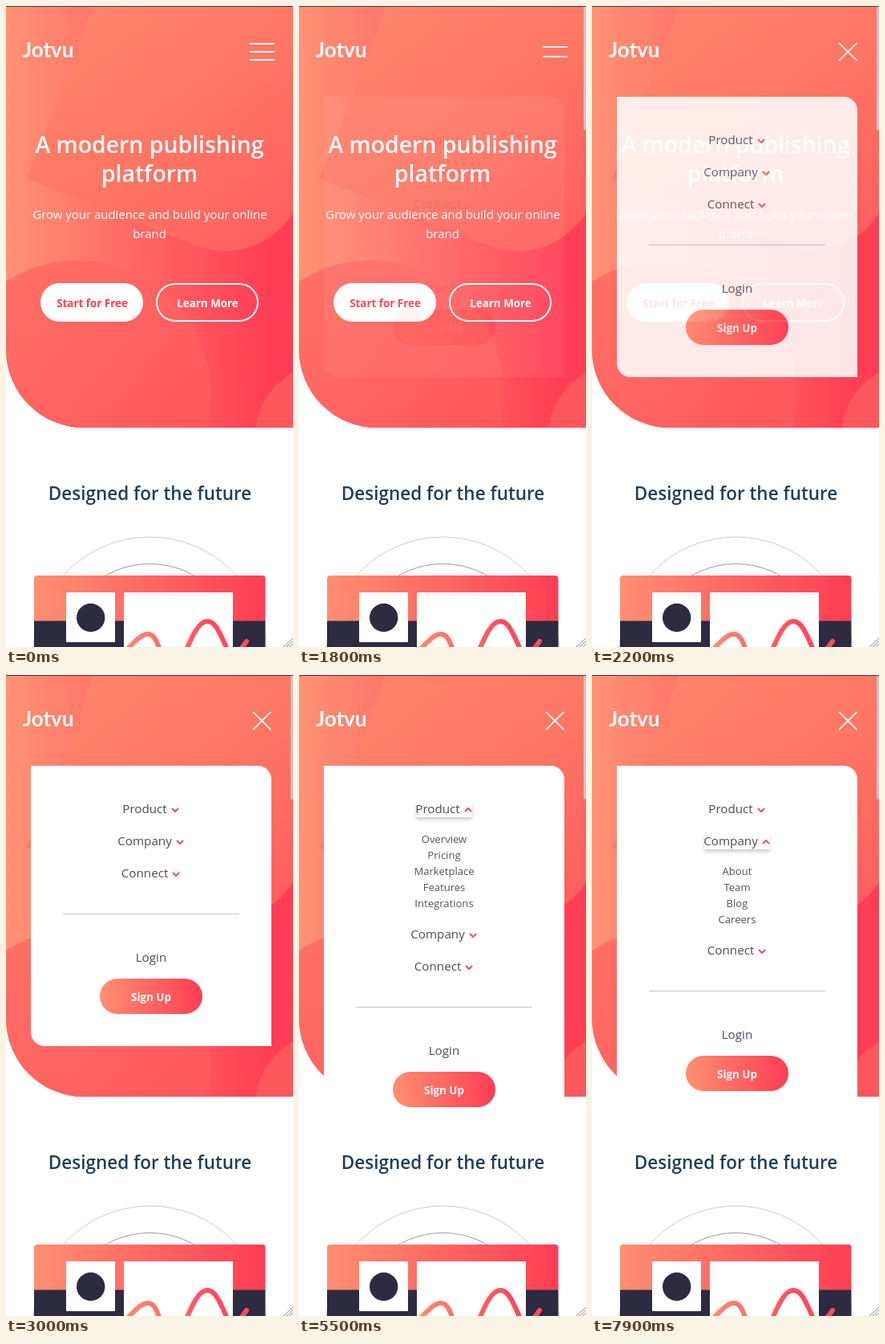
An HTML page that plays this animation: 358x798 px, repeating every 8 s.

```html
<!DOCTYPE html>
<html lang="en">
<head>
<meta charset="utf-8">
<title>Publishing platform menu</title>
<style>
  html, body { margin: 0; width: 100%; height: 100%; overflow: hidden; background: #fff; }
  svg { display: block; width: 100%; height: 100%; }
  text { font-family: "Open Sans", "Noto Sans", sans-serif; }
  .mid { text-anchor: middle; }
  .title { font-size: 28.4px; font-weight: 600; fill: #fff; }
  .lead { font-size: 14.95px; fill: #fff; }
  .btn { font-size: 13.4px; font-weight: 700; }
  .heading { font-size: 22.5px; font-weight: 600; fill: #1f3e5a; }
  .logo { font: 700 26px Lato, sans-serif; fill: #fff; }
  .item { font-size: 15.2px; fill: #4c4b5a; }
  .sub { font-size: 13.1px; fill: #55545f; }
  .chevron { fill: none; stroke: #ff4a5c; stroke-width: 2; }
  .lift { fill: #fff; filter: drop-shadow(0 3px 2px rgba(0, 0, 0, .2)); }
</style>
</head>
<body>
<svg viewBox="0 0 358 798" preserveAspectRatio="none">
  <defs>
    <linearGradient id="warm"><stop stop-color="#ff8f71"/><stop offset="1" stop-color="#ff3d54"/></linearGradient>
    <linearGradient id="heroFill" gradientUnits="userSpaceOnUse" x1="0" y1="0" x2="330" y2="0">
      <stop stop-color="#ff9274"/><stop offset="1" stop-color="#ff3d54"/>
    </linearGradient>
    <linearGradient id="leafFill" gradientUnits="userSpaceOnUse" x1="70" y1="0" x2="310" y2="300">
      <stop stop-color="#ff846b"/><stop offset=".55" stop-color="#ff7664"/><stop offset="1" stop-color="#ff605f"/>
    </linearGradient>
    <linearGradient id="discFill" gradientUnits="userSpaceOnUse" x1="0" y1="330" x2="230" y2="520">
      <stop stop-color="#ff7064"/><stop offset="1" stop-color="#ff585f"/>
    </linearGradient>
    <linearGradient id="curveFill" gradientUnits="userSpaceOnUse" x1="150" y1="0" x2="260" y2="0">
      <stop stop-color="#ff8a70"/><stop offset="1" stop-color="#ff4a5c"/>
    </linearGradient>
    <clipPath id="heroClip"><path d="M0 0H358V525H97A97 97 0 0 1 0 428Z"/></clipPath>
    <clipPath id="cardClip"><rect x="35" y="709" width="288.500" height="100" rx="4"/></clipPath>
    <clipPath id="chartClip"><rect x="147" y="730" width="136" height="68"/></clipPath>
  </defs>

  <rect width="358" height="798" fill="#fff"/>
  <g clip-path="url(#heroClip)">
    <rect width="358" height="525" fill="url(#heroFill)"/>
    <path d="M108 0Q74 100 25 215L236 298A101 101 0 0 0 358 258V0Z" fill="url(#leafFill)"/>
    <circle cx="90" cy="482" r="165.500" fill="url(#discFill)"/>
    <circle cx="400" cy="535" r="89" fill="#ff575e"/>
  </g>
  <rect width="358" height="1" fill="#4a3a3c"/>

  <text class="logo" x="21" y="64">Jotvu</text>
  <g id="burger" stroke="#fff" stroke-width="2">
    <path d="M303.500 0H335"/><path d="M303.500 57H335"/><path d="M303.500 0H335"/>
  </g>

  <g class="mid">
    <text class="title" x="179" y="183">A modern publishing</text>
    <text class="title" x="179" y="219">platform</text>
    <text class="lead" x="179.500" y="265">Grow your audience and build your online</text>
    <text class="lead" x="179" y="289">brand</text>
    <rect x="43" y="345" width="128" height="48" rx="24" fill="#fff"/>
    <text class="btn" x="107.500" y="375" fill="#ff3d4f">Start for Free</text>
    <rect x="188" y="346" width="126" height="46" rx="23" fill="none" stroke="#fff" stroke-width="2"/>
    <text class="btn" x="251.500" y="375" fill="#fff">Learn More</text>
    <text class="heading" x="179.500" y="615">Designed for the future</text>
  </g>

  <g fill="none">
    <circle cx="179.500" cy="806.500" r="145.500" stroke="#cfcccc"/>
    <circle cx="179.500" cy="806.500" r="112" stroke="#9a9898"/>
  </g>
  <g clip-path="url(#cardClip)">
    <rect x="35" y="709" width="289" height="57" fill="url(#warm)"/>
    <rect x="35" y="765.500" width="289" height="33" fill="#2c2b40"/>
  </g>
  <rect x="75" y="730" width="61" height="62" rx="1" fill="#fff"/>
  <circle cx="105.700" cy="761.500" r="17.700" fill="#2c2b40"/>
  <rect x="147" y="730" width="136" height="72" rx="1" fill="#fff"/>
  <g fill="none" stroke="url(#curveFill)" stroke-width="6">
    <path clip-path="url(#chartClip)" d="M146 806C160 792 168 782 177 782S189 794 194 808M222 808C232 785 240 766 251 766S268 783 279 808"/>
  </g>
  <path d="M292 802L300 791" stroke="#ff4a5c" stroke-width="6" stroke-linecap="round"/>
  <path d="M346 798L358 787M350 798L358 790.500M354 798L358 794" stroke="#888" stroke-width="1"/>

  <g id="menu" class="mid">
    <path id="panel" fill="#fff"/>
    <g id="items"></g>
    <g id="foot">
      <path d="M71 297.500H291" stroke="#c6c5ca"/>
      <text class="item" x="181" y="357">Login</text>
      <rect x="117" y="378" width="128" height="44" rx="22" fill="url(#warm)"/>
      <text class="btn" x="181" y="406" fill="#fff">Sign Up</text>
    </g>
  </g>
  <rect id="scroll" x="355" y="1" width="3" height="153.500" fill="#cdcaca" opacity=".9"/>
</svg>

<script>
const LOOP = 8000, SCROLLBAR = 1600, MENU = 1740, FIRST = 5150, SECOND = 7000;
const $ = id => document.getElementById(id);
const clamp = x => Math.min(1, Math.max(0, x));

// CSS "ease": cubic-bezier(.25, .1, .25, 1)
function ease(x) {
  x = clamp(x);
  let lo = 0, hi = 1, s = x;
  for (let i = 0; i < 24; i++) {
    s = (lo + hi) / 2;
    const at = .75 * s * (1 - s) + s ** 3;
    if (at < x) lo = s; else hi = s;
  }
  return .3 * s * (1 - s) ** 2 + 3 * s * s * (1 - s) + s ** 3;
}
const ramp = (t, start, length) => ease((t - start) / length);

function add(parent, name, attrs, label) {
  const node = document.createElementNS("http://www.w3.org/2000/svg", name);
  for (const key in attrs) node.setAttribute(key, attrs[key]);
  if (label) node.textContent = label;
  return parent.appendChild(node);
}

const sections = [
  { name: "Product", x: 173, tip: 211, links: ["Overview", "Pricing", "Marketplace", "Features", "Integrations"] },
  { name: "Company", x: 173, tip: 217, links: ["About", "Team", "Blog", "Careers"] },
  { name: "Connect", x: 173, tip: 212, links: [] }
];

sections.forEach((s, i) => {
  const clip = add(document.querySelector("defs"), "clipPath", { id: "fold" + i });
  s.mask = add(clip, "rect", { x: 31, y: 180, width: 300, height: 0 });
  s.node = add($("items"), "g", {});
  const left = 2 * s.x - s.tip + 11;
  s.lift = add(s.node, "rect", { class: "lift", x: left, y: 158, width: s.tip + 5 - left, height: 19 });
  add(s.node, "text", { class: "item", x: s.x, y: 172 }, s.name);
  s.chevron = add(s.node, "path", { class: "chevron", d: "M-4 -2L0 2L4 -2" });
  s.list = add(s.node, "g", { "clip-path": `url(#fold${i})` });
  s.links.forEach((link, n) =>
    add(s.list, "text", { class: "sub", x: 181, y: 209 + 20 * n }, link));
  s.size = s.links.length ? 16 + 20 * s.links.length : 0;
});

function drawBurger(t) {
  const age = t - MENU;
  const shift = 10 * ramp(age, 0, 250), turn = 45 * ramp(age, 250, 250);
  const [top, middle, bottom] = $("burger").children;
  const pose = (line, y, angle) =>
    line.setAttribute("transform", `translate(0 ${y}) rotate(${angle} 319.25 0)`);
  pose(top, 47 + shift, turn);
  pose(bottom, 67 - shift, -turn);
  middle.setAttribute("opacity", age < 0 ? 1 : 0);
  $("burger").setAttribute("stroke-width", age < 0 ? 2 : 1.7);
}

function drawMenu(t) {
  const swap = ramp(t, SECOND, 300);
  const open = [ramp(t, FIRST, 250) * (1 - swap), swap, 0];
  let extra = 0;
  sections.forEach((s, i) => {
    const p = open[i];
    s.node.setAttribute("transform", `translate(0 ${40 * i + extra})`);
    s.lift.setAttribute("opacity", p);
    s.chevron.setAttribute("transform", `translate(${s.tip} 168) rotate(${180 * p})`);
    s.list.setAttribute("opacity", p);
    s.mask.setAttribute("height", s.size * p);
    extra += s.size * p;
  });
  $("foot").setAttribute("transform", `translate(0 ${extra})`);
  const base = 462 + extra;
  $("panel").setAttribute("d", `M31 113H314a17 17 0 0 1 17 17V${base}H48a17 17 0 0 1 -17 -17Z`);
  $("menu").setAttribute("opacity", ramp(t, MENU, 800));
}

function draw(t) {
  drawBurger(t);
  drawMenu(t);
  $("scroll").setAttribute("visibility", t < SCROLLBAR ? "hidden" : "visible");
}

const begin = performance.now();
function tick() {
  draw((performance.now() - begin) % LOOP);
  requestAnimationFrame(tick);
}
tick();
</script>
</body>
</html>
```
